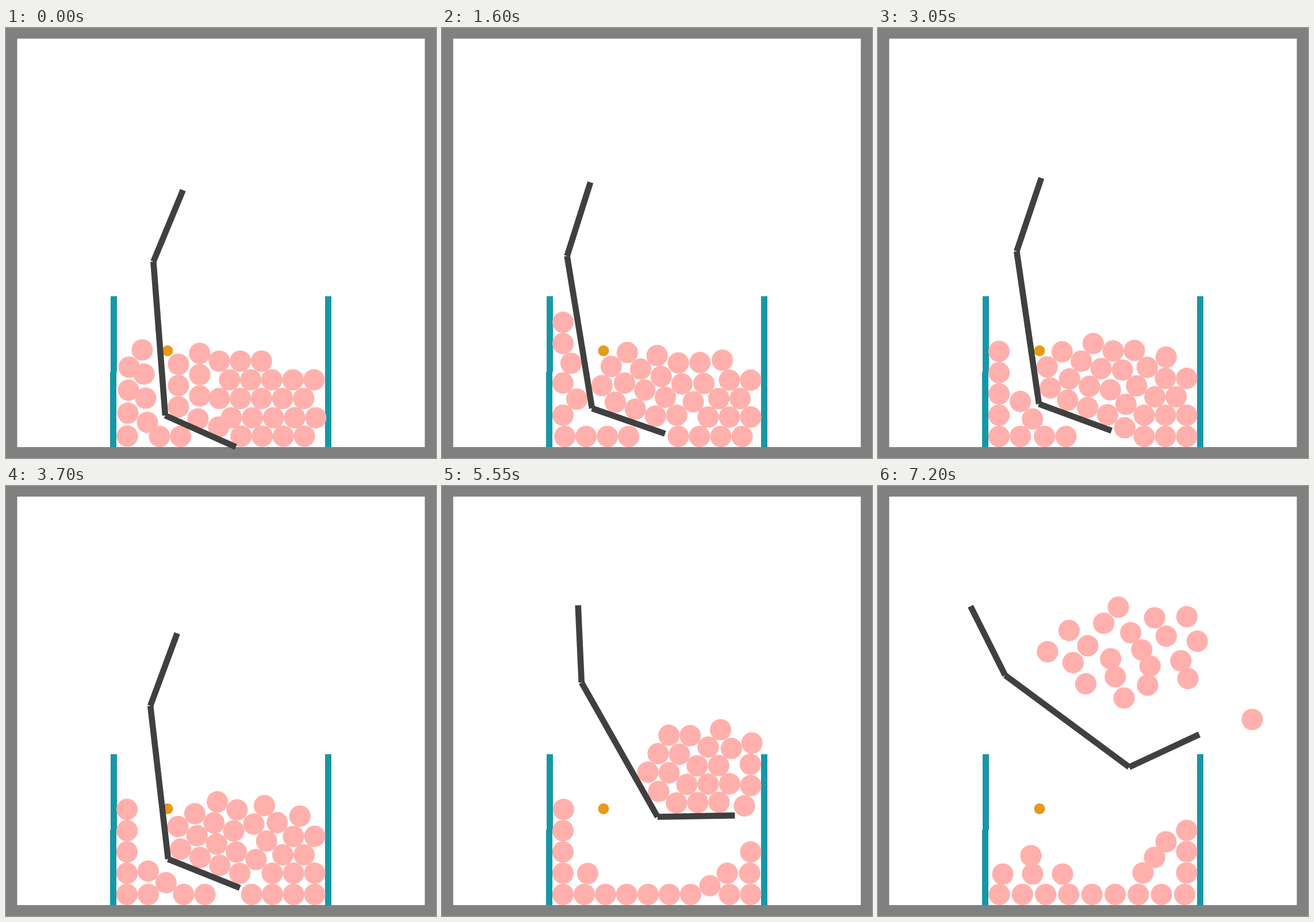
Animation of 748x748 px, one loop 7.25 s. Source, as an HTML page with a canvas:

```html
<!DOCTYPE html>
<html lang="en">
<head>
<meta charset="utf-8">
<title>Scoop and balls</title>
<style>
  html, body { margin: 0; width: 100%; height: 100%; overflow: hidden; background: #808080; }
  canvas { display: block; }
</style>
</head>
<body>
<canvas id="stage" width="748" height="748"></canvas>
<script>
const ctx = document.getElementById('stage').getContext('2d');
const LOOP = 7250, FRAME = 50, SUB = 5, STEP = FRAME / SUB;
const R = 18.5, BAR = 10.6, TOUCH = R + 5;
const FALL = 0.03, DRAG = 0.97, TOP_SPEED = 2.5;
const TOSS = 6400, TOSS_END = 7200;

// Scoop: time, elbow x, elbow y, tilt in degrees
const scoopPath = [
  [0, 277, 674, 24.1], [800, 261, 666, 20.5], [1700, 262, 662, 19],
  [2400, 279, 675, 17.1], [3000, 280, 655, 20], [3700, 282, 649, 21.9],
  [4500, 322, 637, 16.9], [5550, 375, 575.5, -1], [6000, 391, 511, -14],
  [6700, 423, 383, -30], [7200, 437, 489, -25]
];

// A straight run of touching balls
const row = (n, x, y, dx = 36.7, dy = 0) =>
  Array.from({ length: n }, (_, i) => ({ x: x + i * dx, y: y + i * dy }));

// An even scatter inside an ellipse
const cloud = (n, x, y, rx, ry) => Array.from({ length: n }, (_, i) => {
  const r = Math.sqrt((i + 0.5) / n), a = i * 2.4;
  return { x: x + rx * r * Math.cos(a), y: y + ry * r * Math.sin(a) };
});

const startHeap = [
  row(4, 211, 710, 1, -40), row(4, 246, 686, -3, -42), row(2, 267, 710.5),
  row(3, 300, 659, 0, -37), row(3, 337, 640, 0, -37), row(2, 334, 680, 36, 14),
  row(4, 409, 710), row(5, 392, 678), row(5, 371, 644.5),
  row(5, 389, 612), row(3, 371, 579.5)
].flat();

const tossed = [
  cloud(20, 435, 285, 150, 85), row(1, 651, 406),
  row(9, 211, 710.5, 40.3), row(3, 537, 673, 0, -37), row(3, 461, 673, 20, -27),
  row(3, 217, 675, 52), row(1, 266, 643)
].flat();

function slope(i, k) {
  const a = scoopPath[Math.max(i - 1, 0)];
  const b = scoopPath[Math.min(i + 1, scoopPath.length - 1)];
  return (b[k] - a[k]) / (b[0] - a[0]);
}

function scoopValue(t, k) {
  let i = 0;
  while (i < scoopPath.length - 2 && scoopPath[i + 1][0] <= t) i++;
  const a = scoopPath[i], b = scoopPath[i + 1], span = b[0] - a[0];
  const u = Math.min((t - a[0]) / span, 1), v = 1 - u;
  return a[k] * v * v * (1 + 2 * u) + b[k] * u * u * (3 - 2 * u)
    + span * u * v * (v * slope(i, k) - u * slope(i + 1, k));
}

function reach(p, length, degrees) {
  const a = degrees * Math.PI / 180;
  return { x: p.x + length * Math.cos(a), y: p.y + length * Math.sin(a) };
}

function scoopBars(t) {
  const elbow = { x: scoopValue(t, 1), y: scoopValue(t, 2) };
  const tilt = scoopValue(t, 3);
  const neck = reach(elbow, -268.5, tilt + 61.5);
  return [
    [reach(neck, 134.5, tilt - 91.6), neck],
    [neck, elbow],
    [elbow, reach(elbow, 134.5, tilt)]
  ];
}

const bin = [187, 560.5].map(x => [{ x, y: 467 }, { x, y: 729 }]);

function pushOff(ball, [a, b]) {
  const dx = b.x - a.x, dy = b.y - a.y;
  const along = ((ball.x - a.x) * dx + (ball.y - a.y) * dy) / (dx * dx + dy * dy);
  const u = Math.max(0, Math.min(1, along));
  const nx = ball.x - a.x - u * dx, ny = ball.y - a.y - u * dy;
  const d = Math.hypot(nx, ny);
  if (d < TOUCH && d > 0) {
    ball.x += nx / d * (TOUCH - d);
    ball.y += ny / d * (TOUCH - d);
  }
}

function separate(p, q) {
  const dx = q.x - p.x, dy = q.y - p.y, d = Math.hypot(dx, dy);
  if (d >= 2 * R || d === 0) return;
  const k = (2 * R - d) / d / 2;
  p.x -= dx * k; p.y -= dy * k;
  q.x += dx * k; q.y += dy * k;
}

// Give every ball a goal, swapping pairs while the total distance shrinks
function assignGoals(balls, spots) {
  const goals = spots.slice();
  const cost = (b, g) => (b.x - g.x) ** 2 + (b.y - g.y) ** 2;
  let better = true;
  for (let pass = 0; better && pass < 60; pass++) {
    better = false;
    for (let i = 0; i < balls.length; i++) {
      for (let j = 0; j < i; j++) {
        const kept = cost(balls[i], goals[i]) + cost(balls[j], goals[j]);
        const swapped = cost(balls[i], goals[j]) + cost(balls[j], goals[i]);
        if (swapped < kept - 0.01) {
          [goals[i], goals[j]] = [goals[j], goals[i]];
          better = true;
        }
      }
    }
  }
  balls.forEach((b, i) => { b.goal = goals[i]; });
}

function steer(balls, t) {
  if (t === TOSS) assignGoals(balls, tossed);
  const left = (TOSS_END - t) / STEP + 1;
  for (const b of balls) {
    const dx = (b.goal.x - b.x) / left, dy = (b.goal.y - b.y) / left;
    b.x += dx; b.px += dx;
    b.y += dy; b.py += dy;
  }
}

function advance(balls, t) {
  for (const b of balls) {
    const vx = (b.x - b.px) * DRAG, vy = (b.y - b.py) * DRAG + FALL;
    const k = Math.min(1, TOP_SPEED / (Math.hypot(vx, vy) || 1));
    b.px = b.x; b.py = b.y;
    b.x += vx * k; b.y += vy * k;
  }
  const solids = scoopBars(t).concat(bin);
  for (let n = 0; n < 5; n++) {
    for (let i = 0; i < balls.length; i++)
      for (let j = 0; j < i; j++) separate(balls[i], balls[j]);
    for (const b of balls) {
      for (const s of solids) pushOff(b, s);
      b.y = Math.min(b.y, 710.5);
      if (b.y > 500) b.x = Math.max(210.5, Math.min(537, b.x));
    }
  }
  if (t >= TOSS) steer(balls, t);
}

function simulate() {
  const balls = startHeap.map(p => ({ x: p.x, y: p.y, px: p.x, py: p.y }));
  const frames = [];
  for (let t = 0; t < LOOP; t += FRAME) {
    if (t) for (let s = SUB - 1; s >= 0; s--) advance(balls, t - s * STEP);
    frames.push(balls.map(b => ({ x: b.x, y: b.y })));
  }
  return frames;
}

function box(color, x, y, w, h) {
  ctx.fillStyle = color;
  ctx.fillRect(x, y, w, h);
}

function disc(color, x, y, r) {
  ctx.fillStyle = color;
  ctx.beginPath();
  ctx.arc(x, y, r, 0, 2 * Math.PI);
  ctx.fill();
}

function draw(index) {
  box('#808080', 0, 0, 748, 748);
  box('#fff', 19.5, 18.5, 709, 710.5);
  box('#1797a6', 182, 466.5, 11, 131.5);
  box('#1797a6', 181, 598, 11, 131);
  box('#1797a6', 555, 466.5, 11, 262.5);
  disc('#e89a17', 281, 561.5, 9.5);
  for (const b of frames[index]) disc('#ffb0ad', b.x, b.y, 18.6);
  ctx.strokeStyle = '#404040';
  ctx.lineWidth = BAR;
  for (const [a, b] of scoopBars(index * FRAME)) {
    ctx.beginPath();
    ctx.moveTo(a.x, a.y);
    ctx.lineTo(b.x, b.y);
    ctx.stroke();
  }
}

const frames = simulate();
const begin = performance.now();

function tick() {
  const t = (performance.now() - begin) % LOOP;
  draw(Math.floor(t / FRAME));
  requestAnimationFrame(tick);
}
tick();
</script>
</body>
</html>
```
